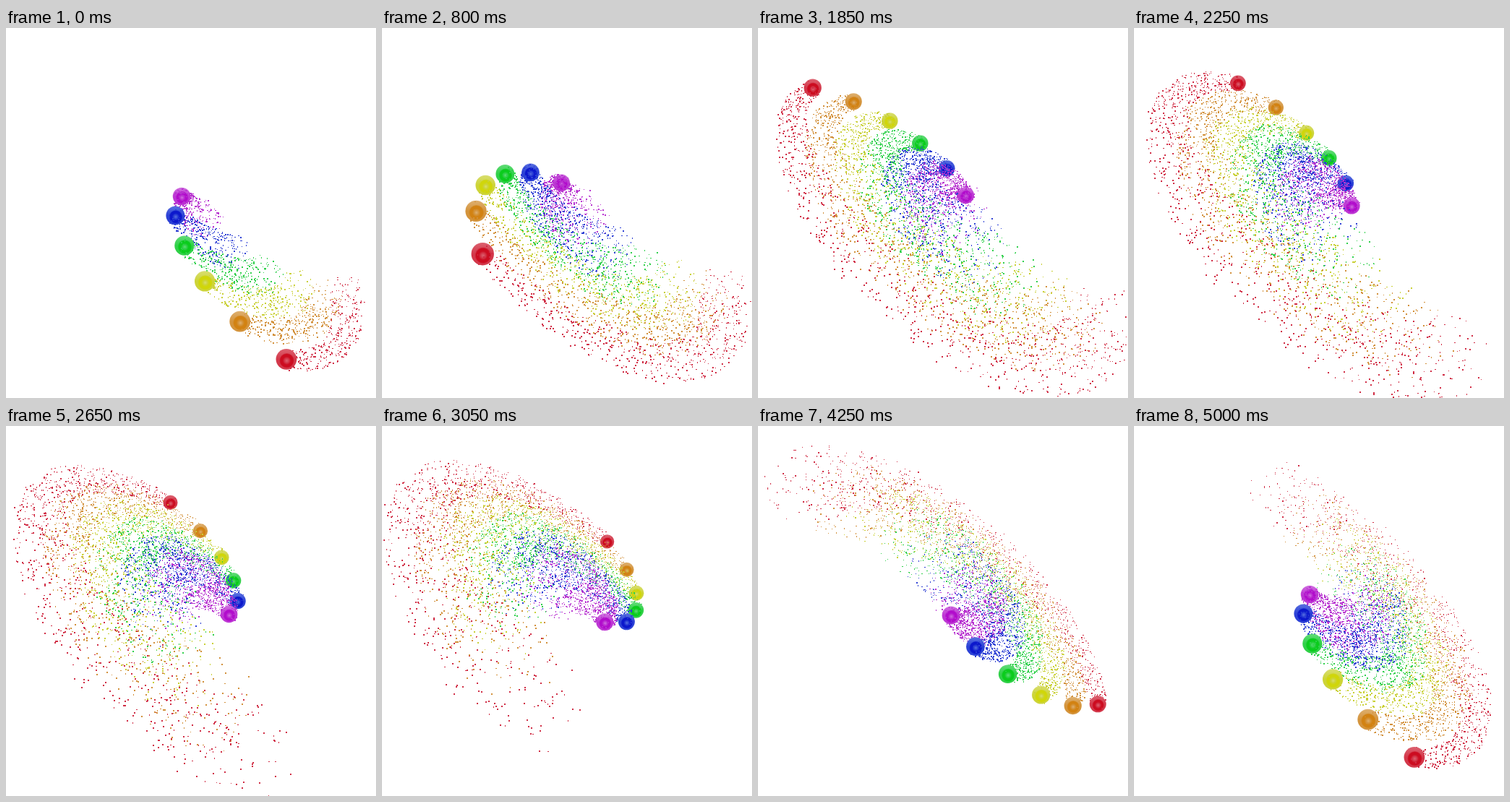
An HTML page with a canvas for the animation above (5050 ms loop, 512 px wide and 512 px high).

```html
<!DOCTYPE html>
<html lang="en">
<head>
<meta charset="utf-8">
<title>Rainbow orbit</title>
<style>
  html, body { margin: 0; width: 100%; height: 100%; overflow: hidden; background: #fff; }
  canvas { display: block; width: 100vw; height: 100vh; }
</style>
</head>
<body>
<canvas id="stage" width="512" height="512"></canvas>
<script>
const ctx = document.getElementById('stage').getContext('2d');

const STEP = 50, FRAMES = 101, PERIOD = 5000;
const FIRST_BIRTH = -900, LIFE = 2500, BIRTH_GAP = 2.7;
const CENTER = [275.7, 244.4], CAMERA = 954, BALL_RADIUS = 12;

// Two perpendicular radii of the tilted orbit, in camera space.
const AXIS_A = [93.6, 178.4, 158.4];
const AXIS_B = [-182.9, -51.4, 166];

// radius is a share of the outermost orbit, lead is in degrees
const balls = [
  { radius: 6 / 6, lead: 0,    dot: '#d02c44', core: '#cc0c20', mid: '#d3384a', rim: '#dc6270' },
  { radius: 5 / 6, lead: 13.6, dot: '#d2903a', core: '#d28212', mid: '#d4943c', rim: '#deb070' },
  { radius: 4 / 6, lead: 27.3, dot: '#c9d036', core: '#d0d60a', mid: '#cdd438', rim: '#d8de70' },
  { radius: 3 / 6, lead: 41.4, dot: '#30d04c', core: '#0acc1c', mid: '#30d048', rim: '#62dc78' },
  { radius: 2 / 6, lead: 60.9, dot: '#2e40d4', core: '#0c18cc', mid: '#2c42d6', rim: '#5a70e0' },
  { radius: 1 / 6, lead: 95,   dot: '#b834d0', core: '#b20ccc', mid: '#be38d4', rim: '#d070e0' }
];

let seed = 20117;
function random() {
  seed = (seed + 0x6D2B79F5) | 0;
  let n = Math.imul(seed ^ (seed >>> 15), 1 | seed);
  n = (n + Math.imul(n ^ (n >>> 7), 61 | n)) ^ n;
  return ((n ^ (n >>> 14)) >>> 0) / 4294967296;
}

function orbit(ball, time) {
  const angle = 2 * Math.PI * (time / PERIOD + ball.lead / 360);
  const u = ball.radius * Math.cos(angle), v = ball.radius * Math.sin(angle);
  return AXIS_A.map((a, i) => a * u + AXIS_B[i] * v);
}

function project([x, y, z]) {
  const scale = 1 / (1 - z / CAMERA);
  return { x: CENTER[0] + x * scale, y: CENTER[1] + y * scale, z, scale };
}

function randomDirection() {
  const z = 2 * random() - 1, turn = 2 * Math.PI * random(), flat = Math.sqrt(1 - z * z);
  return [flat * Math.cos(turn), flat * Math.sin(turn), z];
}

const sparks = [];
for (const ball of balls) {
  for (let birth = FIRST_BIRTH; birth <= PERIOD; birth += BIRTH_GAP) {
    sparks.push({
      birth, color: ball.dot, origin: orbit(ball, birth), direction: randomDirection(),
      speed: 13 + 6 * random(), grain: [random(), random()]
    });
  }
}

function drawSpark({ x, y, scale, color, grain }) {
  const side = g => (g < 1.4 * scale - 1 ? 2 : 1);
  ctx.fillStyle = color;
  ctx.fillRect(Math.round(x), Math.round(y), side(grain[0]), side(grain[1]));
}

function disc(x, y, r, fill) {
  ctx.fillStyle = fill;
  ctx.beginPath();
  ctx.arc(x, y, r, 0, 2 * Math.PI);
  ctx.fill();
}

function drawBall({ x, y, scale, ball }) {
  const r = BALL_RADIUS * scale;
  const shade = ctx.createLinearGradient(0, y - r, 0, y + r);
  shade.addColorStop(0, ball.rim);
  shade.addColorStop(0.5, ball.mid);
  shade.addColorStop(1, ball.mid);
  disc(x, y, r, shade);
  const cx = x + 0.04 * r, cy = y + 0.14 * r;
  const glow = ctx.createRadialGradient(cx, cy, 0, cx, cy, 0.72 * r);
  glow.addColorStop(0, ball.rim);
  glow.addColorStop(0.3, ball.mid);
  glow.addColorStop(0.55, ball.core);
  glow.addColorStop(0.85, ball.core);
  glow.addColorStop(1, ball.mid);
  disc(cx, cy, 0.72 * r, glow);
}

function render(time) {
  const items = balls.map(ball => ({ ...project(orbit(ball, time)), ball }));
  for (const s of sparks) {
    const age = time - s.birth;
    if (age < 0 || age >= LIFE) continue;
    const reach = 11.5 + s.speed * age / 1000;
    const point = project(s.origin.map((o, i) => o + s.direction[i] * reach));
    items.push({ ...point, color: s.color, grain: s.grain });
  }
  items.sort((a, b) => a.z - b.z);
  ctx.fillStyle = '#fff';
  ctx.fillRect(0, 0, 512, 512);
  for (const item of items) item.ball ? drawBall(item) : drawSpark(item);
}

let shown = -1;
function tick() {
  const frame = Math.floor(performance.now() / STEP) % FRAMES;
  if (frame !== shown) render((shown = frame) * STEP);
  requestAnimationFrame(tick);
}
tick();
</script>
</body>
</html>
```
